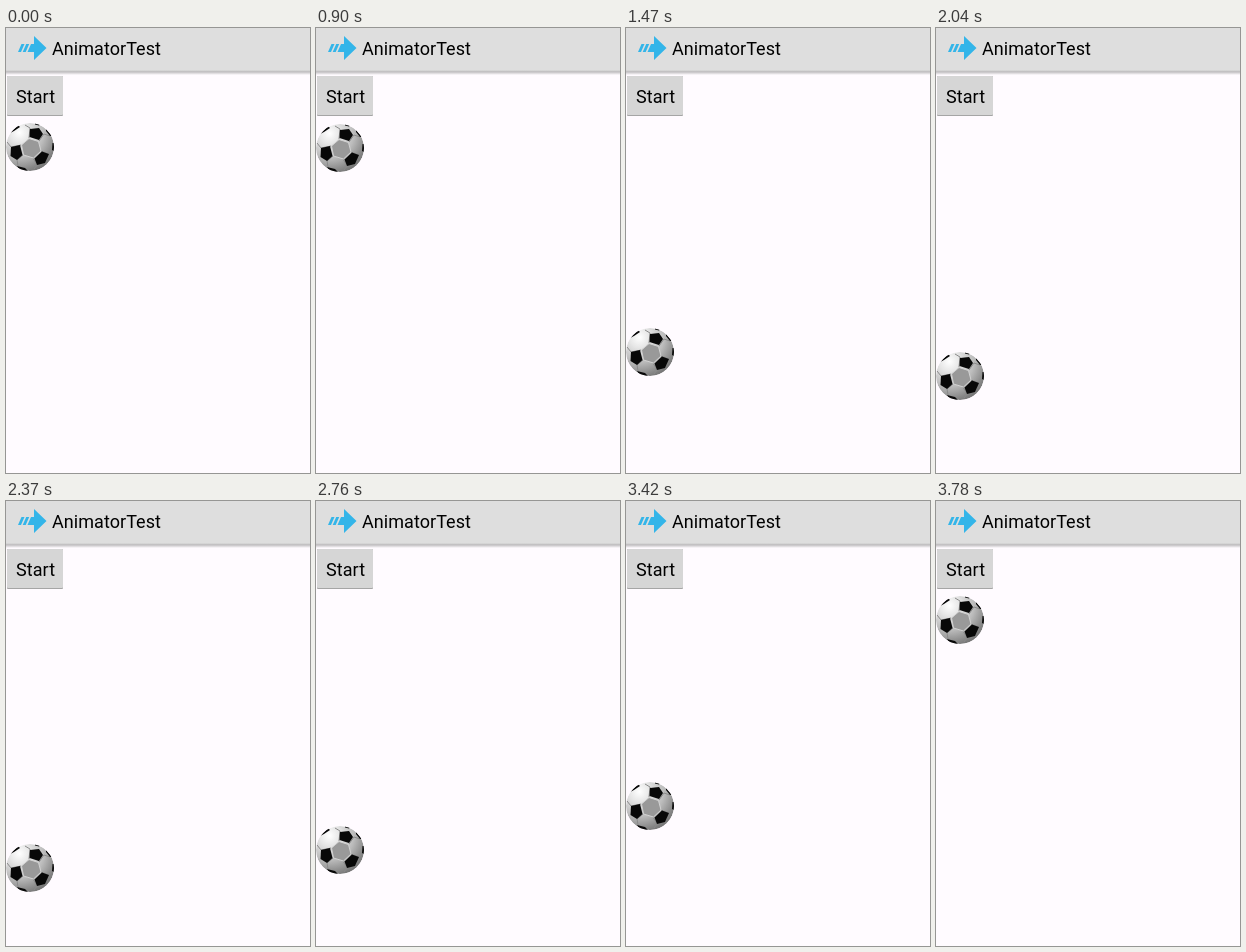
An HTML page that plays this animation: 304 px wide and 445 px high, repeating every 4.32 s.

```html
<!DOCTYPE html>
<html lang="en">
<head>
<meta charset="utf-8">
<title>AnimatorTest</title>
<style>
  html, body { margin: 0; width: 100%; height: 100%; overflow: hidden; background: #fffbff; }
  svg { display: block; }
  text { font: 18px Roboto, sans-serif; letter-spacing: .06px; fill: #000; }
</style>
</head>
<body>
<svg width="304" height="445" viewBox="0 0 304 445">
  <defs>
    <linearGradient id="shadow" x2="0" y2="1">
      <stop offset="0" stop-color="#dedede"/>
      <stop offset=".35" stop-color="#bebcbe"/>
      <stop offset="1" stop-color="#fffbff"/>
    </linearGradient>
    <radialGradient id="shade" cx=".28" cy=".2" r=".85">
      <stop offset="0" stop-color="#fff"/>
      <stop offset=".25" stop-color="#e6e6e6"/>
      <stop offset=".6" stop-color="#bcbcbc"/>
      <stop offset="1" stop-color="#777"/>
    </radialGradient>
    <clipPath id="round"><circle cx="24" cy="24" r="24"/></clipPath>
  </defs>

  <rect width="304" height="445" fill="#fffbff"/>
  <rect width="304" height="42" fill="#dedede"/>
  <rect y="42" width="304" height="5" fill="url(#shadow)"/>
  <g fill="#33b5e9">
    <path d="M28 8L40.500 20L28 32V24H21.500L25 16H28Z"/>
    <path d="M12 24L15.500 16H18.500L15 24ZM16.700 24L20.200 16H23.200L19.700 24Z"/>
  </g>
  <text x="46" y="27">AnimatorTest</text>

  <g id="glow" fill="#33b5e5">
    <rect x="0" y="44" width="61" height="48" rx="4" opacity=".22"/>
    <rect x="0" y="46" width="59" height="44" rx="3" opacity=".3"/>
  </g>
  <rect x="1" y="48" width="56" height="40" rx="1" fill="#a5a5a5"/>
  <rect id="face" x="1" y="48" width="56" height="39" rx="1" fill="#d6d6d6"/>
  <text x="10" y="75">Start</text>

  <g id="ball">
    <g clip-path="url(#round)">
      <circle cx="24" cy="24" r="24" fill="url(#shade)"/>
      <path d="M15 22L5 24M23 15L24 5M33 18L38 11L44 13M35 28L43 31L46 27M27 35L31 42L28 46M17 32L11 37L12 43M5 24L1 19M24 5L19 2M39 40L41 41" stroke="#8a8a8a" fill="none"/>
      <path d="M15.500 22L23 15.500L32.500 18.500L35 28L27.500 35L17.500 32Z" fill="#999" stroke="#d2d2d2"/>
      <g fill="#080808">
        <path d="M5 24L14 22L16.500 32L11 37L4.500 33Z"/>
        <path d="M24 6L33 5L37 11L33 17L23.500 14Z"/>
        <path d="M36 28.500L43 31L39 40L31 42L28.500 35.500Z"/>
        <path d="M4 10L12 2L14 4L8 8ZM29 0L34 1L33 2.500L29 1.500ZM40 6L46 13L44 13L40 8ZM46.500 20H48V28L46 27ZM11 43L19 45L22 48H14Z"/>
      </g>
    </g>
  </g>
</svg>
<script>
const LOOP = 4320, TICK = 30, TOP = 95, DROP = 252, FULL = 1.1226;
const $ = id => document.getElementById(id);

// [time, phase]: the bounce runs forward, then back, with small lags
const keys = [
  [870, 0], [900, 0.0223], [1350, 0.342], [1380, 0.375], [1410, 0.375],
  [1470, 0.428], [1830, 0.728], [1860, 0.757], [2040, 0.8856],
  [2352, FULL], [2760, 0.8127], [3030, 0.609], [3420, 0.3037],
  [3570, 0.1768], [3780, 0]
];

function phase(t) {
  const i = keys.findIndex(k => k[0] > t);
  if (i < 1) return 0;
  const [t0, a] = keys[i - 1], [t1, b] = keys[i];
  return a + (b - a) * (t - t0) / (t1 - t0);
}

function bounce(x) {
  const arc = (mid, base) => 8 * (x - mid) ** 2 + base;
  if (x < 0.3535) return arc(0, 0);
  if (x < 0.7408) return arc(0.54719, 0.7);
  if (x < 0.9644) return arc(0.8526, 0.9);
  return arc(1.0435, 0.95);
}

function draw(now) {
  const t = Math.floor(now % LOOP / TICK) * TICK;
  const pressed = t >= 540 && t < 630;
  const y = Math.round(TOP + DROP * bounce(phase(t)));
  $("ball").setAttribute("transform", `translate(0 ${y})`);
  $("glow").style.display = pressed ? "" : "none";
  $("face").setAttribute("fill", pressed ? "#a9cbd8" : "#d6d6d6");
}

const start = performance.now();
function tick() {
  draw(performance.now() - start);
  requestAnimationFrame(tick);
}
tick();
</script>
</body>
</html>
```
